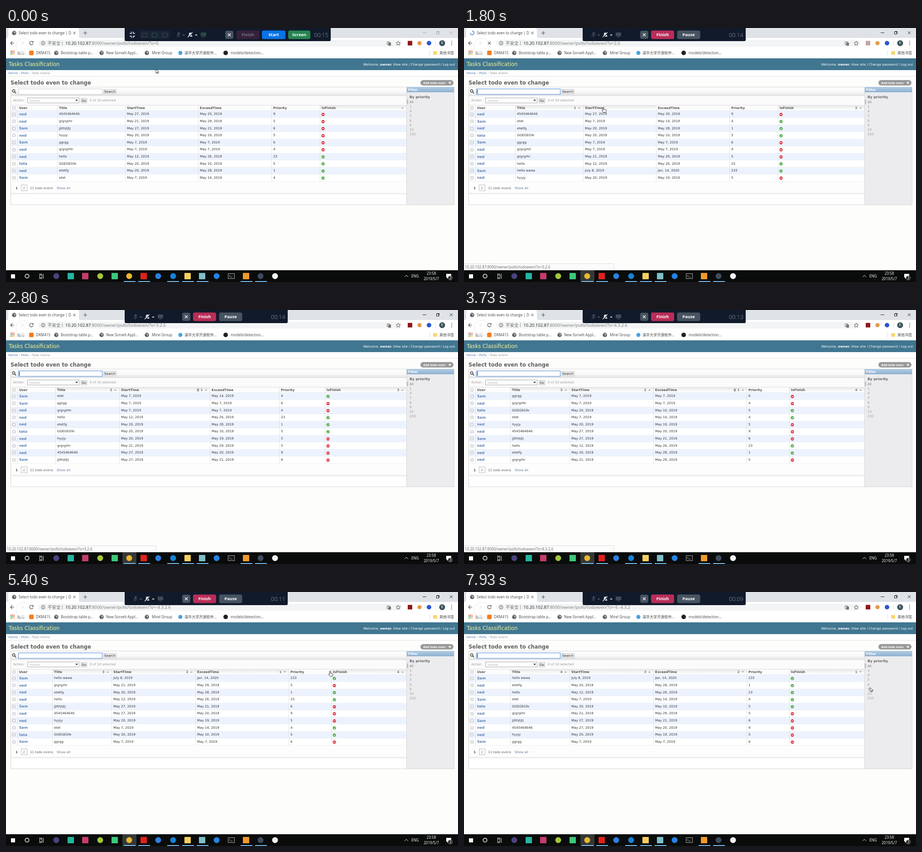
Write an HTML page that moves like this. It is 998 by 561 pixels and loops after 8000 ms.

```html
<!DOCTYPE html>
<html lang="en">
<head>
<meta charset="utf-8">
<title>Task list sorting</title>
<style>
  html, body { margin: 0; height: 100%; overflow: hidden; background: #fdfdfc; }
  svg { display: block; width: 100vw; height: 100vh; }
  text { font: 7.15px "DejaVu Sans", sans-serif; fill: #555; white-space: pre; }
  .b { font-weight: bold; }
  .ui { font: 8.1px "Open Sans", "Noto Sans CJK SC", "Noto Sans CJK", sans-serif; fill: #444; }
  .url { font-size: 9.5px; }
  .brand { font-size: 11.7px; }
  .h1 { font-size: 11.54px; font-weight: bold; }
  .h3 { font-size: 7.6px; font-weight: bold; }
  .user { font-size: 7.8px; font-weight: bold; fill: #5b80b2; }
  .arial { font: bold 7.1px "Liberation Sans", sans-serif; fill: #fff; }
  .mid { text-anchor: middle; }
  .end { text-anchor: end; }
  .btn { font: bold 9.3px "Open Sans", sans-serif; text-anchor: middle; fill: #fff; }
  .timer { font: 300 12.5px "Open Sans", sans-serif; fill: #9299a5; }
</style>
</head>
<body>
<svg viewBox="0 0 998 561" preserveAspectRatio="none">
  <defs>
    <linearGradient id="bar" x2="0" y2="1"><stop stop-color="#fff"/><stop offset=".55" stop-color="#f8f8f8"/><stop offset="1" stop-color="#e2e2e2"/></linearGradient>
    <linearGradient id="sorted" x2="0" y2="1"><stop stop-color="#e4e4e4"/><stop offset=".6" stop-color="#f8f8f8"/><stop offset="1" stop-color="#fff"/></linearGradient>
    <linearGradient id="filter" x2="0" y2="1"><stop stop-color="#b3cde4"/><stop offset="1" stop-color="#8fb1d0"/></linearGradient>
  </defs>
  <g id="still"></g>
  <g id="live"></g>
</svg>
<script>
const LOOP = 8000, STEP = 200 / 3;
const HOST = '10.20.102.87', PATH = ':8000/owner/polls/todoeven/?o=';
const TASKBAR = '#0a0c0b';

const rect = (x, y, w, h, fill, extra = '') => `<rect x="${x}" y="${y}" width="${w}" height="${h}" fill="${fill}" ${extra}/>`;
const frame = (x, y, w, h, fill, stroke, extra = '') => rect(x + .5, y + .5, w - 1, h - 1, fill, `stroke="${stroke}" ${extra}`);
const dot = (x, y, r, fill, extra = '') => `<circle cx="${x}" cy="${y}" r="${r}" fill="${fill}" ${extra}/>`;
const shape = (d, fill, extra = '') => `<path d="${d}" fill="${fill}" ${extra}/>`;
const line = (d, stroke, width = 1, extra = '') => shape(d, 'none', `stroke="${stroke}" stroke-width="${width}" ${extra}`);
const text = (x, y, s, cls = '', fill = '') => `<text x="${x}" y="${y}" class="${cls}"${fill && ` style="fill:${fill}"`}>${s}</text>`;
const at = (x, y, body) => `<g transform="translate(${x} ${y})">${body}</g>`;
const caret = (x, y, fill, up = true) => shape(`M${x - 3} ${up ? y + 1.5 : y - 1.5}h6l-3 ${up ? -3 : 3}z`, fill);
const cross = (x, y, r, stroke, w = 1) => line(`M${x - r} ${y - r}l${2 * r} ${2 * r}m0 ${-2 * r}l${-2 * r} ${2 * r}`, stroke, w);
const globe = (x, y) => dot(x, y, 4.7, '#505458') + line(`M${x - 3} ${y - 1}q2 -3 4 0t-2 3M${x + 1} ${y - 3}l2 3`, '#ddd', 1.1);

// ---------- table data ----------
const rows = [
  ['ned', '4545464646', 'May 27, 2019', 'May 20, 2019', 9, 0],
  ['ned', 'grgrgrhr', 'May 21, 2019', 'May 29, 2019', 5, 0],
  ['Sam', 'jjtthjtjtj', 'May 27, 2019', 'May 21, 2019', 6, 0],
  ['ned', 'hyyjy', 'May 20, 2019', 'May 19, 2019', 5, 0],
  ['Sam', 'ggrgg', 'May 7, 2019', 'May 7, 2019', 6, 0],
  ['ned', 'grgrgrhh', 'May 7, 2019', 'May 7, 2019', 4, 0],
  ['ned', 'hello', 'May 12, 2019', 'May 26, 2019', 23, 1],
  ['tata', 'GGEGEGfe', 'May 20, 2019', 'May 10, 2019', 5, 1],
  ['ned', 'etetfg', 'May 20, 2019', 'May 28, 2019', 1, 1],
  ['Sam', 'etet', 'May 7, 2019', 'May 14, 2019', 4, 1],
  ['Sam', 'hello wawa', 'July 8, 2019', 'Jan. 14, 2020', 233, 1],
];
const heads = ['User', 'Title', 'StartTime', 'ExceedTime', 'Priority', 'IsFinish'];
const wide = [25, 113, 263, 424, 586, 693, 884];
const medium = [25, 109, 250, 450, 603, 704, 884];
const narrow = [25, 102, 233, 418, 624, 718, 884];

function sortKey(row, col) {
  const v = row[col - 1];
  if (col === 2) return v.toLowerCase();
  return col === 3 || col === 4 ? Date.parse(v.replace('.', '')) : v;
}
function sortRows(order) {
  const keys = order.split('.').map(Number);
  return [...rows].sort((a, b) => {
    for (const k of keys) {
      const p = sortKey(a, Math.abs(k)), q = sortKey(b, Math.abs(k));
      if (p !== q) return (p < q ? -1 : 1) * Math.sign(k);
    }
    return 0;
  }).slice(0, 10);
}

// ---------- timeline ----------
const pages = [
  { t: 0, order: '6', cols: wide },
  { t: 1460, click: 1250, order: '2.6', cols: wide },
  { t: 2290, click: 1730, order: '3.2.6', cols: medium },
  { t: 3600, click: 3250, order: '4.3.2.6', cols: narrow },
  { t: 4350, click: 3980, order: '-4.3.2.6', cols: narrow },
  { t: 6600, click: 6350, order: '-6.-4.3.2', cols: narrow },
];
const hovers = [
  { from: 900, to: 1400, col: 2, link: '2.6' },
  { from: 1650, to: 2900, col: 3, link: '3.2.6' },
  { from: 3150, to: 4500, col: 4, link: '4.3.2.6' },
  { from: 5800, to: 6700, col: 6, link: '-6.-4.3.2' },
];
const ticks = [1750, 2950, 4130, 5140, 6130, 6860];
const RECORD_AT = 330, ACTIVE_AT = 1250;
const path = [[0, 331, 91], [900, 140, 174], [1400, 140, 174], [1700, 308, 174.5], [2900, 308, 174.5],
  [3200, 470, 174.5], [4500, 470, 174.5], [5350, 715, 174], [5900, 745, 174], [6600, 745, 174], [7900, 897, 211], [8000, 897, 211]];
const hidden = [[900, 1500], [2300, 4500]];

function cursor(t) {
  if (hidden.some(([a, b]) => t >= a && t < b)) return '';
  const i = path.findIndex((p, k) => k && t <= p[0]);
  const [t0, x0, y0] = path[i - 1], [t1, x1, y1] = path[i];
  const u = (t - t0) / (t1 - t0), e = u * u * (3 - 2 * u);
  const x = x0 + (x1 - x0) * e, y = y0 + (y1 - y0) * e;
  const hand = y > 170 && y < 183 && x < 884;
  return at(x, y, shape(hand
    ? 'M-1 1q1-2 2 0v4l4 .8q1.500.4 1 3.200l-1 3h-5l-3.500-4.500q.5-1.500 2.500 0z'
    : 'M0 0v9l2-2 1.500 3 1.500-.7-1.500-2.800h3z', '#fff', 'stroke="#222" stroke-width=".9"'));
}

// ---------- fixed parts ----------
function browser() {
  const bookmark = (x, s) => text(x, 58, s, 'ui');
  const gridColors = ['#d64', '#c55', '#e84', '#4a5', '#48c', '#e74', '#4a6', '#fb3', '#fb3'];
  return rect(0, 0, 998, 22, '#dfe2e7') + shape('M1 22q4 0 4-4V4q0-4 4-4h148q4 0 4 4v14q0 4 4 4z', '#fff')
    + rect(0, 22, 998, 45, '#fff') + rect(71, 26, 804, 15, '#f3f4f5', 'rx="7.5"')
    + text(28, 14, 'Select todo even to change | D', 'ui') + cross(151, 11, 2.7, '#555')
    + line('M175 7v8m-4-4h8', '#555', 1.2)
    + line('M18 33.500h-8m4-4l-4 4 4 4', '#555', 1.2) + line('M31 33.500h8m-4-4l4 4-4 4', '#bbb', 1.2)
    + dot(82, 33.5, 4, 'none', 'stroke="#555"') + rect(81.5, 31, 1, 5, '#555')
    + text(92, 37, '不安全', 'ui url', '#666') + line('M124.500 29v9', '#999')
    + frame(841, 30, 6, 7, '#fff', '#666') + rect(844, 32, 6, 7, '#777')
    + shape('M866 29l1.400 3 3.300.4-2.400 2.200.6 3.400-2.900-1.700-2.900 1.700.6-3.400-2.400-2.200 3.300-.4z', 'none', 'stroke="#555"')
    + dot(913, 33.5, 4.6, '#e2994a') + dot(934, 33.5, 5, '#2d55d0') + line('M948.500 28v11', '#ddd')
    + dot(963, 33.5, 6.5, '#37505a') + text(963, 36, 'K', 'ui mid', '#fff')
    + [29.5, 33.5, 37.5].map(y => dot(984, y, 1, '#555')).join('')
    + gridColors.map((c, i) => rect(10 + i % 3 * 3.4, 50 + (i / 3 | 0) * 3.4, 2.3, 2.3, c)).join('')
    + bookmark(25, '应用') + rect(51, 50, 10, 10, '#f57d20', 'rx="2"') + bookmark(66, 'DKM415')
    + globe(111, 55) + bookmark(121, 'Bootstrap table p...') + globe(211, 55) + bookmark(221, 'New Sorvelt Appl...')
    + globe(311, 55) + bookmark(322, 'Mirel Group') + dot(385, 55, 4.5, '#4aa3df') + bookmark(394, '清华大学开源软件...')
    + dot(485, 55, 5, '#222') + bookmark(496, 'models/detection...') + line('M935.500 49v12', '#ddd')
    + rect(943, 51, 9, 8, '#f8d775', 'rx="1"') + bookmark(957, '其他书签')
    + dot(39, 40, 17, '#fff', 'opacity=".7" stroke="#ddd"');
}

function adminPage() {
  const values = ['All', 1, 4, 5, 6, 9, 23, 233];
  return rect(0, 67, 998, 26, '#417690') + text(6, 84, 'Tasks Classification', 'brand', '#f4f59a')
    + text(991, 83, 'Welcome, <tspan class="b">owner.</tspan> View site / Change password / Log out', 'end', '#fff')
    + rect(0, 93, 998, 13, '#fff') + rect(0, 106, 998, 1, '#e4e4e4')
    + text(5, 102, 'Home <tspan fill="#999">›</tspan> Polls <tspan fill="#999">› Todo evens</tspan>', '', '#5b80b2')
    + text(10, 124.5, 'Select todo even to change', 'h1', '#606060')
    + rect(915, 115, 73, 12, '#999', 'rx="6"') + text(921, 123.5, 'Add todo even', 'arial') + line('M980 118v6m-3-3h6', '#fff', 1.3)
    + frame(10, 130, 980, 261, '#fff', '#d6d6d6') + rect(11, 131, 873, 19, 'url(#bar)') + rect(11, 149, 873, 1, '#ddd')
    + dot(17, 139, 2.8, 'none', 'stroke="#444" stroke-width="1.4"') + line('M19 141l3 3.500', '#444', 1.8)
    + frame(215, 135, 29, 11, '#eee', '#c8c8c8') + text(217, 143, 'Search', '', '#222')
    + rect(11, 150, 873, 20, '#fbfbfb') + text(16, 162, 'Action:', '', '#999')
    + frame(47, 154, 115, 12, '#fff', '#aaa') + text(52, 163, '---------', '', '#222') + caret(156, 160, '#222', false)
    + frame(165, 155, 14, 11, '#eee', '#c8c8c8') + text(167, 163, 'Go', '', '#222') + text(185, 162, '0 of 10 selected', '', '#999')
    + rect(884, 130, 106, 261, '#ececee') + line('M884.500 130v260.500h105v-260', '#d6d6d6')
    + rect(885, 130, 104, 12, 'url(#filter)') + text(888, 139, 'Filter', 'b', '#fff')
    + text(891, 155, 'By priority', 'h3', '#666') + rect(885, 158, 3, 10, '#c4c4c4')
    + values.map((v, i) => text(891, 166 + i * 10.15, v, '', i ? '#999' : '#777')).join('')
    + rect(11, 339, 873, 24, '#fdfdfd') + text(21, 356, '1', 'b') + frame(33, 346, 14, 14, '#fff', '#bbb') + text(37.5, 356, '2', '', '#5b80b2')
    + text(53, 356, '11 todo evens', '', '#666') + text(112, 356, 'Show all', '', '#68799a')
    + rect(11, 361, 873, 6, 'url(#bar)');
}

function taskbar() {
  const apps = [[111, '#4a4380', 1], [143, '#23b6a0'], [175, '#c63c6c'], [208, '#a4c639', 1], [240, '#3cc77c'],
    [304, '#e2201c'], [336, '#2d7fe0', 1], [369, '#1583d7', 1], [401, '#f6cf60'], [433, '#7cc0c8'],
    [465, '#2583e6', 1], [530, '#f09a2a'], [562, '#3f4c60', 1], [594, '#f4f4f4', 1]];
  return rect(0, 535, 998, 26, TASKBAR)
    + rect(11, 544, 9, 9, '#fff') + dot(46.5, 548, 4.3, 'none', 'stroke="#fff" stroke-width="1.4"')
    + frame(74, 545, 6, 7, 'none', '#ddd') + line('M73 543.500h7m-7 10h7M82.500 543v11', '#ddd')
    + apps.map(([x, c, round]) => round ? dot(x, 548, 6.5, c) : rect(x - 7, 541, 14, 14, c, 'rx="1"')).join('')
    + frame(490, 542, 15, 12, '#111', '#aaa') + line('M493 546l2 1.500-2 1.500m3 1h4', '#ddd', .8)
    + [292, 356, 389, 421, 518, 550].map(x => rect(x, 559, 26, 2, '#76b9ed')).join('')
    + line('M880 550l4-4 4 4', '#ddd') + text(895, 551, 'ENG', 'ui', '#fff')
    + text(939, 544.5, '23:58', 'ui mid', '#fff') + text(939, 556.5, '2019/5/7', 'ui mid', '#fff')
    + shape('M972 543h11v8h-6l-3 3v-3h-2z', '#fff') + dot(981, 552, 4.8, '#222', 'stroke="#aaa" stroke-width=".7"')
    + text(981, 555, '3', 'ui mid', '#fff');
}

// ---------- moving parts ----------
function table({ order, cols }, hover, loading) {
  const keys = order.split('.').map(Number);
  const checkbox = y => frame(14, y - 3.5, 7, 7, '#f4f4f4', '#b5b5b5', 'rx="1"');
  let out = rect(11, 170, 873, 13, '#fcfcfc') + rect(11, 170, 873, 1, '#ddd');
  heads.forEach((name, i) => {
    const col = i + 1, x = cols[i], right = cols[i + 1];
    const rank = keys.findIndex(k => Math.abs(k) === col), sorted = rank >= 0, hot = hover?.col === col;
    if (sorted || hot) out += rect(x, 170, right - x, 13, 'url(#sorted)');
    out += text(x + 4, 179, name, 'b');
    if (!sorted) return;
    out += caret(right - 8.5, 176.5, '#aaa', keys[rank] > 0);
    if (keys.length > 1) out += text(right - 18, 179, rank + 1, 'b mid', '#777');
    if (hot && !loading) out += caret(right - 26, 175, '#888') + rect(right - 27, 176, 2, 4, '#888') + cross(right - 26, 176.5, 3, '#888', .8);
  });
  out += rect(11, 182.5, 873, 1, '#ddd') + checkbox(176.5);
  sortRows(order).forEach((row, i) => {
    const top = 183 + i * 15.6, base = top + 9.4, mid = top + 7.6;
    out += rect(11, top, 873, 15.6, i % 2 ? '#fff' : '#edf3fe') + rect(11, top + 15.1, 873, .6, '#e6e6e6') + checkbox(Math.round(mid));
    row.slice(0, 5).forEach((v, c) => out += text(cols[c] + 4, base + (c ? 0 : .5), v, c ? '' : 'user', c ? '#333' : ''));
    const x = cols[5] + 7;
    out += row[5] ? dot(x, mid + .5, 3.5, '#45a83c') + line(`M${x - 1.7} ${mid + .6}l1.300 1.400 2.200-2.600`, '#fff', 1.1)
      : dot(x, mid + .5, 3.5, '#d9222c') + rect(x - 2.2, mid - .3, 4.4, 1.6, '#fff');
  });
  return out + cols.slice(0, 6).map(x => rect(x, 170, .8, 169, '#dedfd8')).join('');
}

function recorder(t) {
  const recording = t >= RECORD_AT, shift = recording ? 0 : 95, navy = '#111a2b', dim = '#424a58';
  const pill = (x, w, fill, label, color = '#fff') => rect(x, 5.5, w, 19, fill, 'rx="4"') + text(x + w / 2, 18.2, label, 'btn', color);
  const left = 15 - ticks.filter(k => t >= k).length;
  let out = shape(`M262 0h${360 + shift}v26q0 3-3 3h-${354 + shift}q-3 0-3-3z`, navy);
  if (!recording) {
    out += line('M273 12h4v-4m4 0v4h4m0 6h-4v4m-4 0v-4h-4', '#eee', 1.4)
      + rect(296, 6, 66, 18, '#1a2334', 'rx="3"')
      + [['#343d4c', 300], ['#214b43', 322], ['#343d4c', 345]].map(([c, x]) => frame(x, 11, 12, 9, 'none', c, 'stroke-width="1.5"')).join('');
  }
  const mic = line('M-4-1q0 4 4 4t4-4m-4 4v3M-5 5l10-10', dim) + rect(-2, -6, 4, 7, dim, 'rx="2"');
  const mutedBell = shape('M-5 4q2-2 2-6 0-3 3-3t3 3q0 4 2 6z', '#dce0e5') + line('M-5 6.500l11-11', navy, 1.4) + line('M-6 5.500l11-11', '#dce0e5', 1.3);
  const x = recording ? 286 : 381;
  out += at(x, 15, mic) + caret(x + 11.5, 15, '#596170') + at(x + 26, 15, mutedBell) + caret(x + 39, 15, '#dce0e5')
    + rect(x + 49, 10, 12, 8, recording ? dim : '#254c47') + rect(x + 52, 19, 6, 1.5, dim)
    + rect(389 + shift, 6, 18, 18, '#485361', 'rx="4"') + cross(398 + shift, 15, 3, '#fff', 1.3);
  out += recording ? pill(413, 51, '#b92d58', 'Finish') + pill(470.5, 51, '#465360', 'Pause')
    : pill(508.5, 51, '#35223a', 'Finish', '#777080') + pill(565, 52, '#0872e6', 'Start') + pill(623, 49, '#268451', 'Screen');
  return out + text(recording ? 585 : 680, 19.5, '00:' + String(left).padStart(2, 0), 'timer');
}

function scene(t) {
  const page = pages.findLast(p => t >= p.t);
  const loading = pages.some(p => t >= p.click && t < p.t);
  const hover = hovers.find(h => t >= h.from && t < h.to);
  const active = t >= ACTIVE_AT, focused = page !== pages[0], control = active ? '#222' : '#aaa';
  let out = text(131, 37, `${HOST}<tspan fill="#777">${PATH}${page.order}</tspan>`, 'ui url', '#222');
  out += loading
    ? cross(56, 33.5, 3.2, '#555', 1.2) + at(18, 11, line('M0-4.200a4.200 4.200 0 1 1-4.200 4.200', '#3b78e7', 1.4, `transform="rotate(${t * .4 % 360})"`))
    : line('M59.500 31a4 4 0 1 0 .5 3.500M60 29v3h-3', '#555', 1.2) + globe(18, 11);
  out += rect(887, 28.5, 10, 10, loading ? '#c4a5a5' : '#8e1717')
    + line('M920 10.500h8', control) + frame(950, 8, 6, 6, 'none', control) + line('M951.500 7.500h5v5', control, .8) + cross(983, 10.5, 3, control);
  out += frame(27, 134, 186, 13, '#fff', focused ? '#6a9ee0' : '#ccc', focused ? 'stroke-width="1.3"' : '');
  if (focused && (t - page.t) % 1060 < 530) out += rect(29, 136, 1, 9, '#111');
  out += table(page, hover, loading);
  if (hover) out += frame(-1, 520, 333, 16, '#fbfbfb', '#ddd', 'rx="2"') + text(1.5, 530.5, HOST + PATH + hover.link, 'ui', '#666') + rect(0, 535, 332, 1, TASKBAR);
  if (active) out += rect(257, 535, 31, 26, '#363837');
  out += dot(272, 548, 6.5, '#e8b830') + rect(260, 559, 26, 2, '#76b9ed');
  return out + recorder(t) + cursor(t);
}

const still = document.getElementById('still'), live = document.getElementById('live');
still.innerHTML = browser() + adminPage() + taskbar();
let shown = -1;
function draw() {
  const step = Math.floor(performance.now() % LOOP / STEP);
  if (step !== shown) live.innerHTML = scene((shown = step) * STEP);
  requestAnimationFrame(draw);
}
draw();
</script>
</body>
</html>
```
